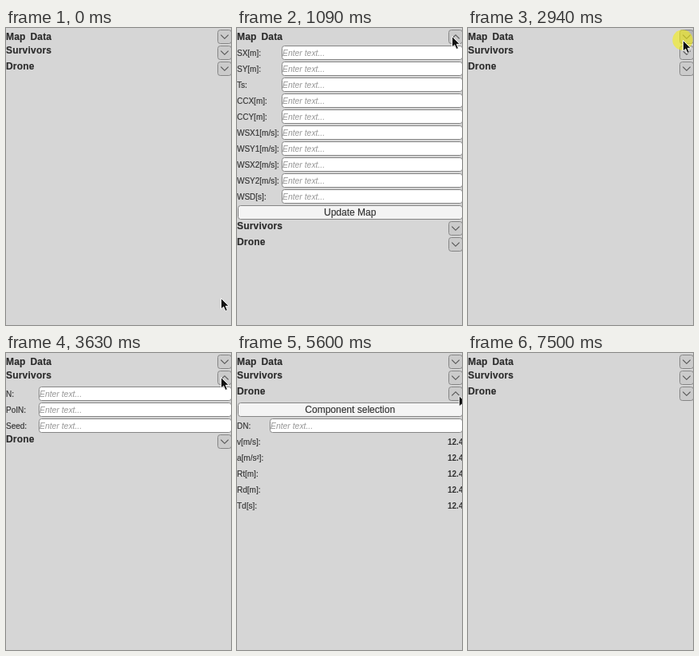
Recreate the animation shown at these times as an HTML page. Size 282 by 372 pixels, loop 7960 ms.

```html
<!DOCTYPE html>
<html lang="en">
<head>
<meta charset="utf-8">
<title>Settings panel</title>
<style>
  html, body { margin: 0; width: 100%; height: 100%; overflow: hidden; background: #d6d6d6; }
  svg { display: block; width: 282px; height: 372px; }
  text { font: 10px "Liberation Sans", Arial, sans-serif; fill: #323232; stroke: #323232; stroke-width: .15; }
  .title { font-size: 12px; font-weight: bold; letter-spacing: .2px; word-spacing: 2.3px; fill: #2a2a2a; }
  .hint { font-size: 10.4px; font-style: italic; fill: #969696; stroke: none; }
  .wide { font-size: 12px; text-anchor: middle; }
  .value { font-weight: bold; stroke: none; }
  .box { stroke: #858585; }
  .chevron { fill: none; stroke: #505050; stroke-width: 1.1; }
</style>
</head>
<body>
<svg id="stage" viewBox="0 0 282 372"></svg>
<script>
const LOOP = 7960, STEP = 70, ROW = 20;
const stage = document.getElementById("stage");

function add(parent, tag, attrs, text) {
  const node = document.createElementNS("http://www.w3.org/2000/svg", tag);
  for (const key in attrs) node.setAttribute(key, attrs[key]);
  if (text) node.textContent = text;
  parent.append(node);
  return node;
}

const label = (parent, x, y, text, cls = "") => add(parent, "text", { x, y, class: cls }, text);
const box = (parent, x, y, width, fill) =>
  add(parent, "rect", { x, y: y - 8.5, width, height: 17, rx: 3, fill, class: "box" });

function field(parent, name, x, y) {
  label(parent, 0, y + 4, name);
  box(parent, x + .5, y, 282 - x, "#fff");
  label(parent, x + 1, y + 4, "Enter text...", "hint");
}

function wideButton(parent, y, name) {
  box(parent, 1.5, y, 281, "#f4f4f4");
  label(parent, 141.7, y + 4.2, name, "wide");
}

// y is the centre line of the fold button, size the height of the open body
function section(name, y, baseline, size, fill) {
  const root = add(stage, "g", {});
  const body = add(root, "g", {});
  label(root, 0, baseline, name, "title");
  const button = box(root, 265.5, y, 17, "#cbcbcb");
  const chevron = add(root, "path", { class: "chevron" });
  fill(body);
  return {
    y, size,
    set(open, shift, color) {
      body.style.display = open ? "" : "none";
      root.setAttribute("transform", `translate(0 ${shift})`);
      button.setAttribute("fill", color);
      const d = open ? -2.3 : 2.3;
      chevron.setAttribute("d", `M269.3 ${y - d}L274 ${y + d}L278.7 ${y - d}`);
    }
  };
}

const sections = [
  section("Map Data", 11, 15, 11 * ROW, body => {
    ["SX[m]", "SY[m]", "Ts", "CCX[m]", "CCY[m]", "WSX1[m/s]", "WSY1[m/s]",
     "WSX2[m/s]", "WSY2[m/s]", "WSD[s]"]
      .forEach((name, i) => field(body, name + ":", 56, 31 + ROW * i));
    wideButton(body, 231, "Update Map");
  }),
  section("Survivors", 31, 32, 3 * ROW, body =>
    ["N:", "PoIN:", "Seed:"].forEach((name, i) => field(body, name, 41, 51 + ROW * i))),
  section("Drone", 51, 52, 7 * ROW, body => {
    wideButton(body, 71, "Component selection");
    field(body, "DN:", 41, 91);
    ["v[m/s]:", "a[m/s²]:", "Rt[m]:", "Rd[m]:", "Td[s]:"].forEach((name, i) => {
      label(body, 0, 115 + ROW * i, name);
      label(body, 264, 115 + ROW * i, "12.45", "value");
    });
  })
];

const glow = add(stage, "circle", { r: 12.7, fill: "#f5ef10", "fill-opacity": .6 });
const pointer = add(stage, "path", {
  d: "M.5 .5V14L3.7 11.2L6 16.5L8.5 15.4L6.3 10.3H10.4Z",
  fill: "#111", stroke: "#fff", "stroke-width": .9
});

const home = { x: 269, y: 338 };
const moves = [
  { from: 70, to: 550, x: 269, y: 16, bend: -6 },
  { from: 820, to: 820, x: 269, y: 10 },
  { from: 1420, to: 1630, x: 286, y: 90 },
  { from: 1770, to: 2050, x: 269, y: 15 },
  { from: 3150, to: 3290, x: 269, y: 30 },
  { from: 5040, to: 5180, x: 273, y: 47.5 },
  { from: 5530, to: 5670, x: 279.5, y: 55 },
  { from: 7010, to: 7500, x: 288, y: 275, bend: -8 }
];
const clicks = [
  { at: 820, hold: 270, target: 0 }, { at: 2800, hold: 210, target: 0 },
  { at: 3490, hold: 140, target: 1 }, { at: 4760, hold: 140, target: 1 },
  { at: 5320, hold: 140, target: 2 }, { at: 6870, hold: 140, target: 2 }
];

const smooth = p => p * p * (3 - 2 * p);

// The pointer advances in whole steps, the first one at the start of the move
function pointerAt(time) {
  let { x, y } = home;
  for (const move of moves) {
    if (time < move.from) break;
    const count = Math.round((move.to - move.from) / STEP) + 1;
    const p = Math.min(1, (Math.floor((time - move.from) / STEP) + 1) / count);
    x += (move.x - x) * smooth(p) + (move.bend || 0) * Math.sin(Math.PI * p);
    y += (move.y - y) * smooth(p);
  }
  return { x, y };
}

// A section folds or unfolds one step before the button is released
function openAt(time) {
  let open = -1;
  for (const { at, hold, target } of clicks)
    if (time >= at + hold - STEP) open = open === target ? -1 : target;
  return open;
}

function draw(time) {
  const { x, y } = pointerAt(time);
  const open = openAt(time);
  const click = clicks.find(c => time >= c.at && time < c.at + c.hold);
  let shift = 0;
  sections.forEach((part, i) => {
    const pressed = click && click.target === i;
    const hover = open < 0 && x < 282 && Math.abs(y - part.y - shift) < 9;
    part.set(i === open, shift, pressed ? "#b4b4b4" : hover ? "#dedede" : "#cbcbcb");
    if (i === open) shift += part.size;
  });
  glow.setAttribute("cx", x);
  glow.setAttribute("cy", y);
  glow.style.display = click ? "" : "none";
  pointer.setAttribute("transform", `translate(${x} ${y})`);
}

const start = performance.now();
function tick() {
  draw((performance.now() - start) % LOOP);
  requestAnimationFrame(tick);
}
tick();
</script>
</body>
</html>
```
